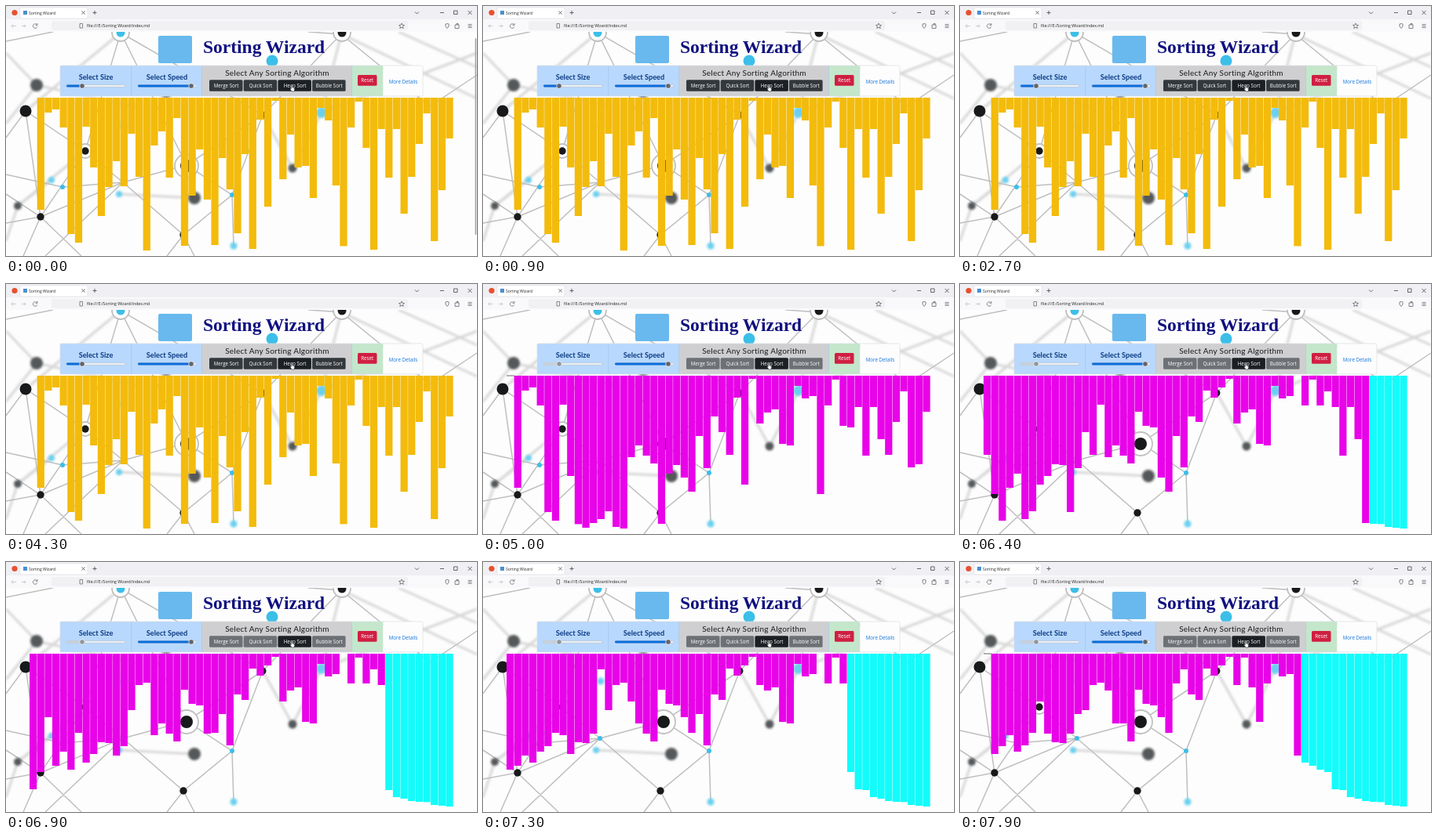
Animation, 600 px wide and 319 px high, one loop 8000 ms. Source, as an HTML page:

```html
<!DOCTYPE html>
<html lang="en">
<head>
<meta charset="utf-8">
<title>Heap sort</title>
<style>
  html, body { margin: 0; width: 100%; height: 100%; overflow: hidden; background: #fff; }
  svg { display: block; width: 100%; height: 100%; }
  text { font-family: "Open Sans", "Noto Sans", sans-serif; }
  .label { font-family: Lato, sans-serif; text-anchor: middle; }
  .button { font-size: 6.2px; fill: #fff; text-anchor: middle; }
  .icon { fill: none; stroke: #55555c; stroke-width: .9; }
</style>
</head>
<body>
<svg viewBox="0 0 600 319" id="stage">
  <defs>
    <filter id="soft" x="-50%" y="-50%" width="200%" height="200%"><feGaussianBlur stdDeviation="1.8"/></filter>
    <filter id="slight"><feGaussianBlur stdDeviation=".5"/></filter>
  </defs>
  <rect width="600" height="319" fill="#fdfdfd"/>
  <g id="network"></g>

  <!-- browser window -->
  <rect width="600" height="17" fill="#f0f0f4"/>
  <rect y="17" width="600" height="16" fill="#f9f9fb"/>
  <rect x="18" y="2" width="86" height="14" rx="2" fill="#fff" stroke="#dcdce2" stroke-width=".6"/>
  <rect x="58" y="19" width="454" height="12" rx="2" fill="#f1f1f4"/>
  <circle cx="11" cy="8.5" r="3.6" fill="#e8502f"/>
  <rect x="22" y="6" width="5" height="5" fill="#4b8fd0"/>
  <text x="29" y="10.6" font-size="5" fill="#222">Sorting Wizard</text>
  <text x="103" y="27.2" font-size="5.2" fill="#222">file:///E:/Sorting Wizard/index.md</text>
  <path class="icon" d="M96.500 6.500l4 4m0-4l-4 4M110.500 8.500h5m-2.500-2.500v5M521 7.500l2.500 2.500l2.500-2.500M553 8.500h5M570.500 6h4.500v4.500h-4.500zM588.500 6l5 5m0-5l-5 5"/>
  <path class="icon" stroke-opacity=".3" d="M13 25.500h-6m2.500-2.500l-2.500 2.500l2.500 2.500M20 25.500h5m-2-2l2 2l-2 2"/>
  <path class="icon" stroke-opacity=".75" d="M39.500 24a2.800 2.800 0 1 0 .3 2.500M40 22v2.400h-2.400M94 22.500h3.500v5.500h-3.500z"/>
  <path class="icon" stroke-opacity=".8" d="M504 22l1 2.300 2.500.2-1.900 1.600.6 2.400-2.200-1.300-2.200 1.300.6-2.400-1.900-1.600 2.500-.2zM560 23q3-1 4 0v3l-2 2.500l-2-2.500zM572 24h5v4.500h-5zM574 24v-1.500h2v1.500M588.500 23.500h5m-5 2h5m-5 2h5"/>
  <rect id="scrollbar" x="597.500" y="41" width="1.800" height="251" rx=".9" fill="#a8a8a8"/>

  <!-- heading -->
  <rect x="194" y="38" width="43" height="35" rx="2" fill="#69b9ee"/>
  <text x="251" y="60.200" font-size="23.500" font-weight="700" fill="#101080" style="font-family:'Liberation Serif',serif">Sorting Wizard</text>

  <!-- control panel -->
  <rect x="69" y="76" width="91" height="39" fill="#b8d8fd"/>
  <rect x="160" y="76" width="89.500" height="39" fill="#b8d8fd"/>
  <rect x="249.500" y="76" width="191" height="39" fill="#cfcfd1"/>
  <rect x="440.500" y="76" width="40" height="39" fill="#c4e6cb"/>
  <rect x="480.500" y="76" width="50.500" height="39" fill="#fdfdfe"/>
  <path d="M159.700 76v39M249.500 76v39M440.500 76v39" stroke="#a5c5e6" stroke-width=".7"/>
  <rect x="69" y="76" width="462" height="39" rx="1.500" fill="none" stroke="#d8dde2" stroke-width=".7"/>
  <text class="label" x="114.500" y="93.500" font-size="9.2" font-weight="700" fill="#0b3a82">Select Size</text>
  <text class="label" x="205" y="93.500" font-size="9.2" font-weight="700" fill="#0b3a82">Select Speed</text>
  <text class="label" x="345.500" y="89.300" font-size="10" letter-spacing=".25" fill="#17191c">Select Any Sorting Algorithm</text>
  <g id="controls"></g>
  <rect x="448" y="88" width="24.500" height="13.800" rx="1.500" fill="#d01f42"/>
  <text class="button" x="460.200" y="97.300">Reset</text>
  <text x="506" y="98.700" font-size="6.2" text-anchor="middle" fill="#1274d8">More Details</text>

  <path id="baseline" d="M30 117h10" stroke="#555" stroke-width=".9"/>
  <g id="bars"></g>
  <path d="M364 109l-2.300-3.500q.6-1 1.500.2v-4q.8-1 1.500 0v2.200l2.500.7q.7.5.4 2l-.5 2.400z" fill="#fff" stroke="#111" stroke-width=".5"/>
</svg>
<script>
const LOOP = 8000, START = 4400, TICK = 100;
const TOP = 117, LEFT = 30, PITCH = 9.643;
const heights = [
  0, 143, 19, 15, 38, 174, 185, 37, 89, 151, 114, 81, 113, 46,
  101, 195, 61, 43, 102, 26, 189, 125, 66, 130, 188, 77, 117, 173,
  72, 193, 28, 139, 4, 104, 47, 89, 87, 128, 13, 29, 112, 189.4,
  38, 5, 64, 194, 40, 102, 40, 148, 101, 59, 20, 183, 118, 52
];
const count = heights.length;

function add(parent, tag, attrs, text) {
  const node = document.createElementNS("http://www.w3.org/2000/svg", tag);
  set(node, attrs);
  if (text) node.textContent = text;
  document.getElementById(parent).appendChild(node);
  return node;
}
function set(node, attrs) {
  for (const key in attrs) node.setAttribute(key, attrs[key]);
}

// Background: sharp and blurred nodes joined by grey links.
const blurredLinks = "M25 134L146 34M39 101L0 150M0 60L39 101L170 130M15 255L101 185M58 222L15 255L0 300M240 245L144 240M365 207L327 139M365 207L402 136L600 60M402 136L427 36L600 118M500 33L600 78";
const sharpLinks = "M0 168L25 134L101 185L146 34L230 203L149 225L44 269L101 185L149 225L226 292L288 241L230 203L327 139L288 241L290 306M25 134L44 269L0 277M0 240L44 269L96 319M44 269L22 319M149 225L50 319M0 215L72 231L149 225M327 139L427 36L385 33M146 34L327 139M427 36L540 128L600 88M226 292L205 319M226 292L240 319M0 45L60 33";
add("network", "path", { d: blurredLinks, fill: "none", stroke: "#d6d6d6", "stroke-width": 3, filter: "url(#soft)" });
add("network", "path", { d: sharpLinks, fill: "none", stroke: "#bfbfbf", "stroke-width": 1.5, filter: "url(#slight)" });

const DARK = "#17191b", GREY = "#55585a", BLUE = "#3bbfe8", PALE_BLUE = "#6bd0f0";
function dot(x, y, r, fill, ring = 0) {
  if (ring) add("network", "circle", { cx: x, cy: y, r: ring, fill: "#fff", stroke: "#c0c0c0", "stroke-width": 1.8, filter: "url(#slight)" });
  const blur = fill === GREY || fill === PALE_BLUE;
  add("network", "circle", { cx: x, cy: y, r, fill, ...(blur && { filter: "url(#soft)" }) });
}
[[39, 101, 8], [15, 255, 5], [240, 245, 8], [365, 207, 5.5], [204, 109, 8]].forEach(([x, y, r]) => dot(x, y, r, GREY));
[[58, 222, 4], [144, 240, 4], [150, 152, 4.5], [290, 306, 4.5], [402, 136, 7]].forEach(([x, y, r]) => dot(x, y, r, PALE_BLUE));
[[25, 134, 7.5, 0], [101, 185, 4.7, 9], [44, 269, 4.7, 0], [230, 204, 8, 15], [226, 292, 4.7, 0], [327, 139, 4.5, 0], [428, 34, 5.5, 11]]
  .forEach(([x, y, r, ring]) => dot(x, y, r, DARK, ring));
[[146, 34, 5.5, 11], [339, 70, 7.5, 0], [72, 231, 3, 0], [149, 225, 3, 0], [288, 241, 3, 0]]
  .forEach(([x, y, r, ring]) => dot(x, y, r, BLUE, ring));

// Sliders and buttons
function slider(x, value) {
  add("controls", "rect", { x, y: 100.6, width: 75, height: 2.8, rx: 1.4, fill: "#eff2f5", stroke: "#9fb0c2", "stroke-width": .5 });
  const fill = add("controls", "rect", { x, y: 100.6, width: value, height: 2.8, rx: 1.4 });
  const thumb = add("controls", "circle", { cx: x + value, cy: 102, r: 3.3, fill: "#6a6a70", stroke: "#fff", "stroke-width": .7 });
  return running => {
    set(fill, { fill: running ? "#cbd0d6" : "#0a6ddb" });
    set(thumb, { fill: running ? "#8f979f" : "#62646c" });
  };
}
const sizeSlider = slider(77, 20);
slider(168, 68)(false);
const buttons = ["Merge", "Quick", "Heap", "Bubble"].map((name, i) => {
  const x = 259 + i * 43.7;
  const box = add("controls", "rect", { x, y: 94.3, width: 42.5, height: 14.4, rx: 1.5 });
  add("controls", "text", { class: "button", x: x + 21.6, y: 103.9 }, name + " Sort");
  return { box, chosen: name === "Heap" };
});

// Heap sort: one step per swap; cues tie steps to times.
const steps = [], cues = [];
const values = [...heights];
let sorted = count;

function record() { steps.push({ values: [...values], sorted }); }
function cue(time, stepsBack = 0) { cues.push([steps.length - 1 - stepsBack, time]); }
function swap(i, j) {
  [values[i], values[j]] = [values[j], values[i]];
  record();
}
function sift(i, size) {
  let largest = i;
  for (const child of [2 * i + 1, 2 * i + 2])
    if (child < size && values[child] > values[largest]) largest = child;
  if (largest !== i) {
    swap(i, largest);
    sift(largest, size);
  }
}
function simulate() {
  record();
  cue(4450);
  for (let i = count / 2 - 1; i >= 0; i--) {
    sift(i, count);
    if (i === 8) cue(4990);
  }
  for (let end = count - 1; ; end--) {
    swap(0, end);
    if (end === 50) cue(6390);
    if (end === 41) return cue(7890);
    sorted = end;
    sift(0, end);
    if (end === 45) cue(7290, 1);
  }
}
simulate();

function stepAt(time) {
  const next = cues.findIndex(([, at]) => at > time);
  if (next === 0) return steps[0];
  if (next < 0) return steps[steps.length - 1];
  const [fromStep, from] = cues[next - 1], [toStep, to] = cues[next];
  return steps[Math.floor(fromStep + (toStep - fromStep) * (time - from) / (to - from))];
}

const bars = heights.map((h, i) => add("bars", "rect", { x: LEFT + i * PITCH, y: TOP, width: PITCH - .4 }));
const baseline = document.getElementById("baseline");
const scrollbar = document.getElementById("scrollbar");

function draw(time) {
  const running = time >= START;
  const step = stepAt(time);
  bars.forEach((bar, i) => set(bar, {
    height: step.values[i],
    fill: !running ? "#f3bb0c" : i >= step.sorted ? "#14fbfb" : "#e803e8"
  }));
  buttons.forEach(({ box, chosen }) => set(box, { fill: chosen ? "#1c2024" : running ? "#6d7176" : "#33383d" }));
  sizeSlider(running);
  set(baseline, { visibility: running && step.values[0] < 2 ? "visible" : "hidden" });
  set(scrollbar, { opacity: Math.max(0, 1 - time / 500) });
}

const origin = performance.now();
function frame() {
  const time = (performance.now() - origin) % LOOP;
  draw(Math.floor(time / TICK) * TICK);
  requestAnimationFrame(frame);
}
frame();
</script>
</body>
</html>
```
